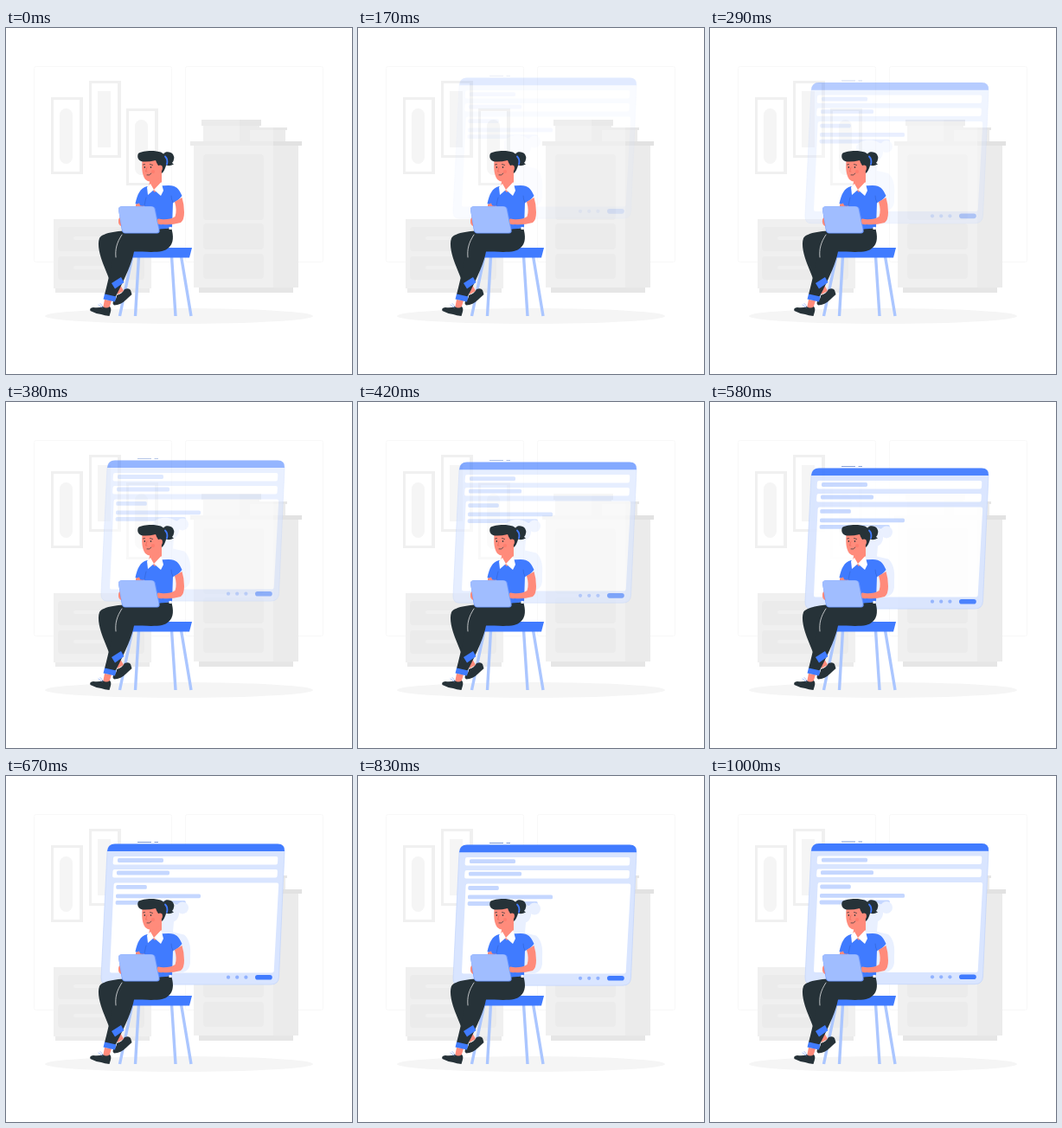
An HTML page that plays this animation: 400 by 400 pixels, repeating every 1040 ms.

```html
<!DOCTYPE html>
<html lang="en">
<head>
<meta charset="utf-8">
<title>Woman working at a laptop</title>
<style>
  html, body { margin: 0; width: 100%; height: 100%; overflow: hidden; background: #fff; }
  svg { display: block; width: 100vw; height: 100vh; }
  .blue { fill: #407bff; }
  .pale { fill: #c5d7ff; }
  .dark { fill: #263238; }
  .skin { fill: #ff8b7b; }
  .g1 { fill: #f5f5f5; }
  .g2 { fill: #f0f0f0; }
  .g3 { fill: #ebebeb; }
  .g4 { fill: #e6e6e6; }
  .line { fill: none; stroke-linecap: round; stroke-linejoin: round; }
</style>
</head>
<body>
<svg viewBox="0 0 400 400">
  <defs>
    <g id="frame">
      <path class="g2" d="M0 0H37V89H0Z"/>
      <path fill="#fff" d="M3 3H33V86H3Z"/>
    </g>
    <clipPath id="page"><path d="M125 123H315L310 227H120Z"/></clipPath>
  </defs>

  <g id="room">
    <g fill="none" stroke="#f8f8f8">
      <rect x="32.5" y="44.5" width="159" height="226" rx="2"/>
      <rect x="207.5" y="44.5" width="159" height="226" rx="2"/>
    </g>
    <ellipse class="g1" cx="200" cy="333" rx="155" ry="9"/>
    <use href="#frame" x="52" y="80"/>
    <use href="#frame" x="96" y="61"/>
    <use href="#frame" x="139" y="93"/>
    <rect class="g1" x="62" y="93" width="15" height="64" rx="7.5"/>
    <rect class="g1" x="106" y="73" width="15" height="65"/>
    <rect class="g1" x="149" y="106" width="15" height="64" rx="7.5"/>

    <path class="g3" d="M57 299H166V306H57Z"/>
    <path class="g2" d="M55 221H168V301H55Z"/>
    <rect class="g3" x="60" y="230" width="100" height="28" rx="4"/>
    <rect class="g3" x="60" y="264" width="100" height="27" rx="4"/>
    <rect class="g2" x="78" y="241" width="64" height="4" rx="2"/>
    <rect class="g2" x="78" y="275" width="64" height="4" rx="2"/>

    <path class="g2" d="M228 113H270V131H228Z"/>
    <path class="g3" d="M270 113H293V131H270ZM226 106H270V113H226Z"/>
    <path class="g4" d="M270 106H295V113H270Z"/>
    <path class="g2" d="M282 118H309V131H282Z"/>
    <path class="g3" d="M309 118H323V131H309ZM280 115H309V118H280Z"/>
    <path class="g4" d="M309 115H325V118H309ZM223 299H332V306H223Z"/>
    <path class="g2" d="M217 136H309V300H217Z"/>
    <path class="g3" d="M309 136H338V300H309ZM213 131H309V136H213Z"/>
    <path fill="#e2e2e2" d="M309 131H342V136H309Z"/>
    <rect class="g3" x="228" y="146" width="70" height="76" rx="4"/>
    <rect class="g3" x="228" y="226" width="70" height="30" rx="4"/>
    <rect class="g3" x="228" y="261" width="70" height="29" rx="4"/>
  </g>

  <g id="window" opacity="0">
    <path fill="#7f9bd6" d="M152 75.5H168V76.5H152ZM171.500 75.500H176V76.500H171.500Z"/>
    <path fill="#d9e5ff" stroke="#bdd0fb" stroke-width=".6" d="M125 78.500H315Q322.500 78.500 322 87L315.500 232Q315 240.700 306 240.700H117Q109.600 240.700 110 232L117 87Q117.500 78.500 125 78.500Z"/>
    <path class="blue" d="M117 86.700Q117.600 78 126 78H314Q322.600 78 322 86.700Z"/>
    <g fill="#fff">
      <path d="M126 92.500H312.500Q314.400 92.500 314.300 94.500L314 100Q313.900 102 312 102H125.500Q123.500 102 123.600 100L124 94.500Q124.100 92.500 126 92.500Z"/>
      <path d="M125.500 107.500H312Q314 107.500 313.900 109.500L313.600 115Q313.500 117 311.500 117H125Q123 117 123.100 115L123.500 109.500Q123.600 107.500 125.500 107.500Z"/>
      <path d="M127 123H313Q315.300 123 315.200 125.300L309.700 225Q309.500 227 307.300 227H122Q119.900 227 120 225L124.600 125.300Q124.700 123 127 123Z"/>
    </g>
    <g id="bars" class="pale"></g>
    <g clip-path="url(#page)" fill="#e9f0ff">
      <circle cx="204" cy="152" r="7"/>
      <path d="M169 152C175 141 194 143 199 151C202 159 199 166 194 168L193 180L206 183C212 188 214 197 213 208V216Q212 225 203 227H170Z"/>
    </g>
    <g fill="#91b2ff">
      <circle cx="257" cy="232.300" r="2.100"/>
      <circle cx="267.200" cy="232.300" r="2.100"/>
      <circle cx="277.400" cy="232.300" r="2.100"/>
    </g>
    <rect class="blue" x="288" y="229.500" width="19.800" height="5.600" rx="2.800"/>
  </g>

  <g id="woman">
    <path class="line" stroke="#abc6ff" stroke-width="3.400" style="stroke-linecap:butt" d="M146 264L131.500 333M153.500 264L149.500 333M191.500 264L196 333M202.500 264L214 333"/>
    <path class="blue" d="M148 254H215L212 265.500H140Z"/>

    <path class="skin" d="M125 297L131 295L136 304L129 308ZM114 314L122 315L119 325L112 324Z"/>
    <path class="dark" d="M128 309Q135 307 137 302Q142 300 144 303L145.500 308Q142 311 139 314Q133 320 125 320.500Q122 318 125 315Q128 313 128 309Z"/>
    <path class="dark" d="M112 322Q116 325 120 322Q122 324 121 328L119.500 333Q114 332.500 110 331Q103 330 97.500 327Q96 323.500 101 323Q107 324 112 322Z"/>
    <path class="line" stroke="#9dbbff" stroke-width=".9" d="M107 320L111 323M109 318.500L112 322"/>

    <path class="dark" d="M150 234C132 234 112 236 108 243C105 251 109 264 112 272L122 297L134 290L128 268C126 258 128 250 133 241L160 245Z"/>
    <path class="dark" d="M133 236L191 231C194 240 194 249 188 254C182 260 172 259 148 258.500C146 270 139 287 126 312L114 308C119 290 123 267 127 254Q130 242 133 236Z"/>
    <path class="line" stroke="#fff" stroke-width=".7" d="M134 239C128 248 126 256 127 265"/>
    <path class="blue" d="M122 295L133 288L136.500 294L126 301.500ZM114 307.500L127.500 310.500L126 316.500L112.500 313.500Z"/>

    <path class="skin" d="M154 196L162 201L156 213H149Z"/>
    <path class="blue" d="M163 183C155 185 152 192 149.500 203Q154 206.500 160 205.500L164 231Q178 234 192 230.500L193 202Q199 200 203.500 194C200 186 197 182 188 182Z"/>
    <path class="line" stroke="#2f62d2" stroke-width=".6" d="M193 202Q191 198 191 194M160 205Q161 200 162 196"/>
    <path class="skin" d="M195 201L203.500 196Q206 204 206 213Q206 222 202 225Q191 228 181 227Q176 228 174 224Q174 219 179 221Q189 222 195.500 218Q198 211 195 201Z"/>
    <path fill="#fff" d="M188.500 230H191.500V233H188.500Z"/>

    <path class="skin" d="M167 173L180 167L180 182L172 190L165 183Z"/>
    <path fill="#fff" d="M167 180L163 184L164 193L171 187ZM179.500 178L182 188L179 194L171 187Z"/>
    <path class="skin" d="M157.500 153C157 162 157 169 161 175Q165 179 171 177Q178 175 180 168L182 153L170 148Z"/>
    <path class="dark" d="M158 154.500C153 154 151 149 153 145C158 141.500 172 141 179 143.500C186 147 187 153 185 159Q183 166 180 168Q180 160 176 159Q174 156 173 153Q165 155 158 154.500Z"/>
    <path class="skin" d="M175 161Q177 157 180.500 159.500Q182 164 178 167L175 167Z"/>
    <path class="dark" d="M182 148C181 142 190 142 193 146Q196 151 192 156L194 157.500Q188 160.500 184 158Z"/>
    <path class="line" stroke="#407bff" stroke-width="1.800" d="M184 148.500Q187.500 152 186 157.500"/>
    <ellipse class="dark" cx="160.300" cy="161" rx=".7" ry="1"/>
    <ellipse class="dark" cx="167.500" cy="161" rx=".7" ry="1"/>
    <path class="line" stroke="#263238" stroke-width=".7" d="M158.500 158L160.500 157.500M166.500 157.500L169.500 158.500M163 170Q166 171 168 168"/>
    <path class="line" stroke="#e9685a" stroke-width=".7" d="M163 161L161.500 166H163"/>
    <circle fill="#ff6f61" opacity=".5" cx="170" cy="166" r="2"/>

    <path class="skin" d="M134 218Q129 219 130 225Q131 230 136 229Z"/>
    <path class="skin" d="M150 204L154 202.500L156 208H150Z"/>
    <path fill="#6b97ff" d="M134 206.300H168.500Q172 206.300 172.800 209.500L177.600 234Q178 237.400 174.500 237.400H138Q134.500 237.400 133.900 234L130 210Q130 206.300 134 206.300Z"/>
    <path fill="#a0bdff" d="M133.500 206.300H167.500Q171 206.300 171.700 209.500L176.500 233Q177 236.800 173.500 236.800H138Q135 236.800 134.300 233L130 210Q130 206.300 133.500 206.300Z"/>
    <path class="skin" d="M175 222Q179 220 181 222V226Q178 228 175.600 226Z"/>
  </g>
</svg>
<script>
  const LOOP = 1040, FPS = 24, DROP = 24, LEAD = 0.035, FIRST = 3;
  const win = document.getElementById('window');

  // x, y, width of the placeholder text lines
  const lines = [[129, 94.7, 53], [128, 109.2, 61], [127.3, 125.6, 35.5], [127, 136, 98], [126.7, 143.6, 81]];
  document.getElementById('bars').innerHTML = lines.map(([x, y, w]) =>
    `<rect x="${x}" y="${y}" width="${w}" height="4.8" rx="1.6"/>`).join('');

  const curve = (a, b, s) => 3 * a * s * (1 - s) ** 2 + 3 * b * s * s * (1 - s) + s ** 3;

  // cubic-bezier(.36, -.01, .5, 1.38), solved by bisection
  function ease(x) {
    if (x >= 1) return 1;
    let lo = 0, hi = 1;
    for (let i = 0; i < 24; i++) {
      const mid = (lo + hi) / 2;
      if (curve(0.36, 0.5, mid) < x) lo = mid; else hi = mid;
    }
    return curve(-0.01, 1.38, lo);
  }

  const stepStart = k => Math.round(k * 100 / FPS) * 10;

  function draw(ms) {
    const t = ms % LOOP;
    let k = 0;
    while (k < FPS && stepStart(k + 1) <= t) k++;
    const p = ease(k / FPS + LEAD);
    win.setAttribute('opacity', k < FIRST ? 0 : Math.max(0, Math.min(1, p)));
    win.setAttribute('transform', `translate(0 ${DROP * (p - 1)})`);
  }

  const start = performance.now();
  function tick() {
    draw(performance.now() - start);
    requestAnimationFrame(tick);
  }
  tick();
</script>
</body>
</html>
```
